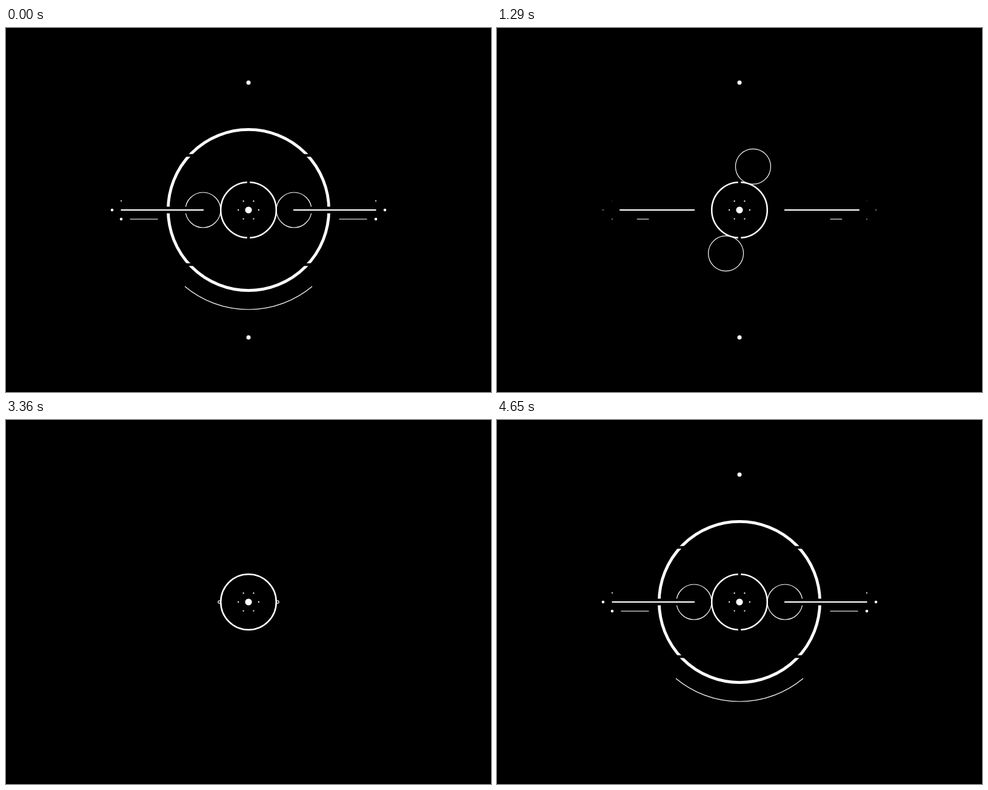
Recreate the animation shown at these times as an HTML page with a canvas. Size 800 by 600 pixels, loop 4680 ms.

```html
<!DOCTYPE html>
<html lang="en">
<head>
<meta charset="utf-8">
<title>Orbital rings</title>
<style>
html, body { margin: 0; width: 100%; height: 100%; overflow: hidden; background: #000; }
canvas { display: block; }
</style>
</head>
<body>
<canvas id="stage" width="800" height="600"></canvas>
<script>
const ctx = document.getElementById('stage').getContext('2d');
const LOOP = 4680, STEP = 30, TURN = Math.PI * 2, RAD = Math.PI / 180;
const WHITE = '#fff', BLACK = '#000';

const sine = u => (1 - Math.cos(Math.PI * u)) / 2;
const cubic = u => u < 0.5 ? 4 * u ** 3 : 1 - 4 * (1 - u) ** 3;
const expoOut = u => u >= 1 ? 1 : 1 - 2 ** (-10 * u);
const expoIn = u => u <= 0 ? 0 : 2 ** (10 * (u - 1));

function progress(t, start, length, ease) {
  return ease(Math.min(1, Math.max(0, (t - start) / length)));
}

// 1 at rest, falls to 0 during `out`, rises back to 1 during `back`.
function presence(t, out, back) {
  return t < 2600 ? 1 - progress(t, ...out) : progress(t, ...back);
}

function disc(x, y, r) {
  if (r <= 0) return;
  ctx.fillStyle = WHITE;
  ctx.beginPath();
  ctx.arc(x, y, r, 0, TURN);
  ctx.fill();
}

function ring(x, y, r, width, from = 0, to = TURN, style = WHITE) {
  if (r <= 0) return;
  ctx.strokeStyle = style;
  ctx.lineWidth = width;
  ctx.beginPath();
  ctx.arc(x, y, r, from, to);
  ctx.stroke();
}

function box(x, y, w, h, style = WHITE) {
  ctx.fillStyle = style;
  ctx.fillRect(x, y, w, h);
}

function mirrored(draw) {
  for (const side of [-1, 1]) {
    ctx.save();
    ctx.scale(side, 1);
    draw();
    ctx.restore();
  }
}

// White sweep that is erased from `start` up to `edge` degrees, with a soft front.
function erased(start, edge, soft) {
  const g = ctx.createConicGradient(start * RAD, 0, 0);
  const stop = a => Math.min(1, Math.max(0, a / 360));
  const hidden = edge - soft;
  if (hidden > 0) {
    g.addColorStop(0, BLACK);
    g.addColorStop(stop(hidden), BLACK);
  }
  g.addColorStop(stop(edge), WHITE);
  g.addColorStop(1, WHITE);
  return g;
}

function drawCore(t) {
  const r = 45.8 * presence(t, [1620, 400, sine], [2940, 430, sine]);
  if (r > 0) ring(0, 0, r, Math.min(2.5, r));
  const topGap = t < 2600 || t >= 3590, bottomGap = t < 2600 || t >= 4130;
  if (topGap) box(-2.3, -50, 4.6, 22.7, BLACK);
  if (bottomGap) box(-2.3, 27.3, 4.6, 22.7, BLACK);

  const spread = presence(t, [1820, 290, sine], [2930, 320, sine]);
  for (let i = 0; i < 6 && spread > 0; i++) {
    const spin = 360 * progress(t, 66 + i * 11, 948, cubic);
    const a = (i * 60 - 60 + spin) * RAD;
    disc(Math.cos(a) * 16.8 * spread, Math.sin(a) * 16.8 * spread, 1.15);
  }

  if (t < 2430) disc(0, 0, 5.6 * (1 - progress(t, 2090, 340, sine)));
  else if (t >= 2790) disc(0, 0, 1 + 4.6 * progress(t, 2820, 320, sine));
}

function drawOuterRing(t) {
  if (t < 2600) {
    const edge = 383 * progress(t, 150, 390, sine);
    if (edge >= 383) return;
    ring(0, 0, 132.6, 4.8, -Math.PI / 2, 1.5 * Math.PI, edge > 0 ? erased(-90, edge, 23) : WHITE);
  } else {
    const grow = progress(t, 3360, 400, cubic), r = 132.6 * grow;
    ring(0, 0, r, Math.min(2 * r, 4.8 + 29 * (1 - grow)));
  }
  const cut = 4.4 * (t < 2600 ? 1 : progress(t, 3880, 260, sine));
  mirrored(() => {
    for (const y of [-90, 90]) box(85, y - cut / 2, 30, cut, BLACK);
  });
}

function drawLowerArc(t) {
  const left = 129.8 * RAD, right = 50.2 * RAD;
  if (t < 2600) {
    const edge = 87 * progress(t, 600, 410, sine);
    if (edge >= 87) return;
    ring(0, 0, 164, 1.2, right, left, edge > 0 ? erased(50.2, edge, 8) : WHITE);
  } else {
    const grow = progress(t, 3960, 380, sine);
    if (grow > 0) ring(0, 0, 164, 1.2, left - (left - right) * grow, left);
  }
}

function orbitAngle(t) {
  if (t >= 1780) return 180;
  if (t < 1400) return 0.0332 * t + 3.88e-5 * t * t;
  return 180 - 57.5 * ((1780 - t) / 380) ** 1.4;
}

function drawGlint(size) {
  if (size <= 0) return;
  ctx.save();
  ctx.rotate(-15.6 * RAD);
  ctx.translate(22.3, 0);
  ctx.scale(size, size);
  ctx.fillStyle = WHITE;
  ctx.beginPath();
  ctx.moveTo(0, -8.4);
  ctx.quadraticCurveTo(4.4, 0, 0, 8.4);
  ctx.quadraticCurveTo(-3.8, 0, 0, -8.4);
  ctx.fill();
  ctx.restore();
}

function drawMoons(t) {
  const r = 29 * presence(t, [1597, 700, u => u * u], [3160, 1160, sine]);
  if (r <= 0) return;
  const a = orbitAngle(t) * RAD, d = 46 + r;
  const glint = Math.sin(Math.PI * progress(t, 750, 240, u => u));
  for (const half of [Math.PI, 0]) {
    ctx.save();
    ctx.translate(d * Math.cos(a + half), d * Math.sin(a + half));
    ring(0, 0, r, 1.2);
    if (half === 0) ctx.rotate(Math.PI);
    drawGlint(glint);
    ctx.restore();
  }
}

function drawWings(t) {
  const bar = presence(t, [1170, 420, cubic], [3720, 420, expoOut]);
  const dots = presence(t, [1110, 300, sine], [3900, 300, sine]);
  const dash = presence(t, [1110, 330, sine], [3960, 340, sine]);
  mirrored(() => {
    if (bar > 0) {
      box(74, -5.5, 136.5 * bar, 11, BLACK);
      box(74, -1.1, 136.5 * bar, 2.2);
    }
    disc(225, 0, 2.3 * dots);
    disc(210, 15, 2.3 * dots);
    disc(210, -15, 1.1 * dots);
    if (dash > 0) box(149.5, 14.5, 46 * dash, 1.1);
  });
}

function drawPole(t, side, outStart, backStart) {
  if (t > 1790 && t < backStart) return;
  const reach = time => 210 * presence(time, [outStart, 400, expoIn], [backStart, 420, expoOut]);
  const tail = t < 2600 ? reach(t) : reach(Math.max(backStart, t - 33));
  ctx.strokeStyle = WHITE;
  ctx.lineWidth = 7;
  ctx.lineCap = 'round';
  ctx.beginPath();
  ctx.moveTo(0, side * tail);
  ctx.lineTo(0, side * reach(t) + 0.01);
  ctx.stroke();
  ctx.lineCap = 'butt';
}

function render(t) {
  ctx.setTransform(1, 0, 0, 1, 0, 0);
  box(0, 0, 800, 600, BLACK);
  ctx.translate(400, 300);
  drawOuterRing(t);
  drawLowerArc(t);
  drawMoons(t);
  drawWings(t);
  drawCore(t);
  drawPole(t, -1, 1364, 3691);
  if (t < 4650) drawPole(t, 1, 1346, 4231);
}

const origin = performance.now();
function tick() {
  const t = (performance.now() - origin) % LOOP;
  render(Math.floor(t / STEP) * STEP);
  requestAnimationFrame(tick);
}
tick();
</script>
</body>
</html>
```
